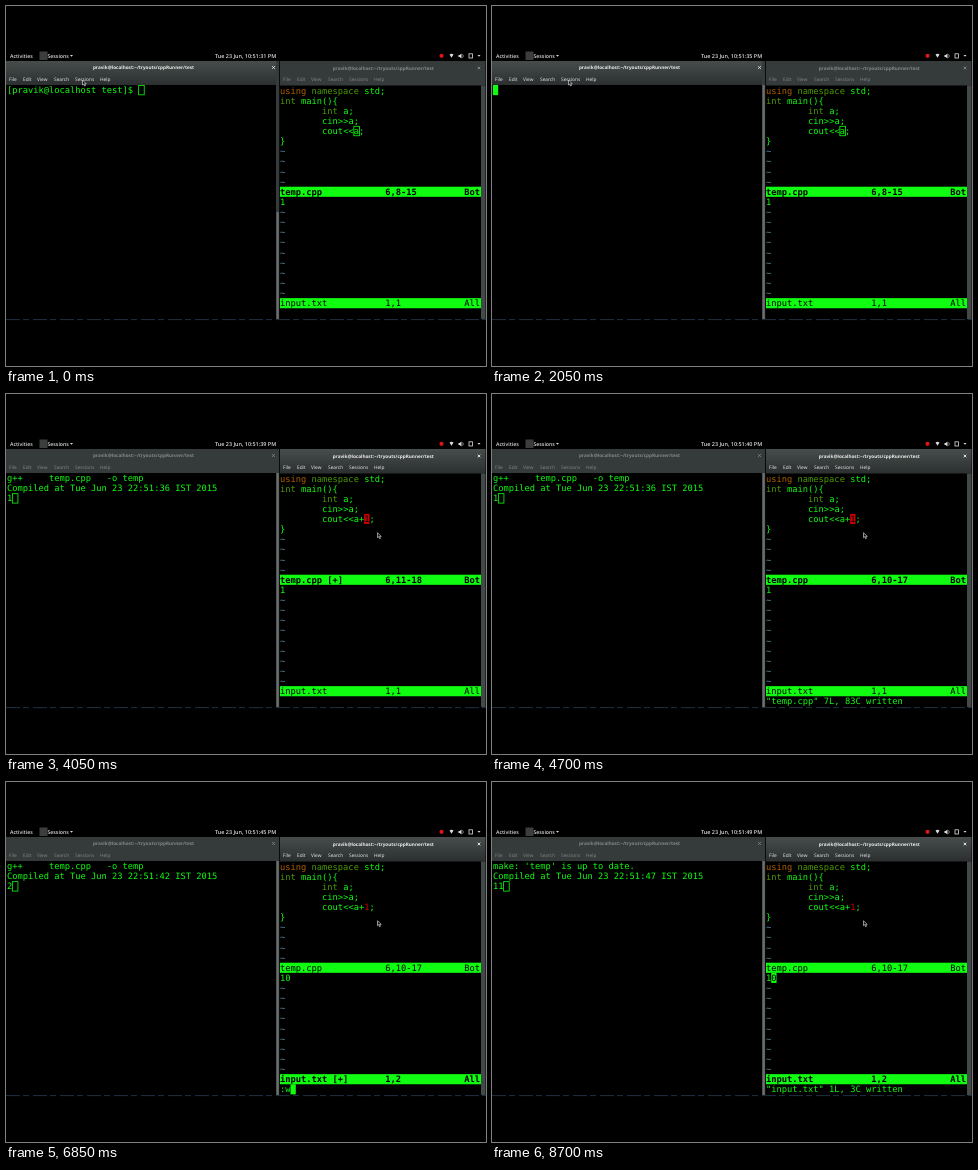
Write an HTML page that moves like this. It is 480 px wide and 360 px high and loops after 8800 ms.

```html
<!DOCTYPE html>
<html lang="en">
<head>
<meta charset="utf-8">
<title>Compile on save</title>
<style>
  html, body { margin: 0; width: 100%; height: 100%; overflow: hidden; background: #000; }
  svg { display: block; width: 480px; height: 360px; }
  text { white-space: pre; text-rendering: geometricPrecision; }
  .mono { font: 8.74px "DejaVu Sans Mono", monospace; }
  .ui { font: 4.8px "Open Sans", "Noto Sans", sans-serif; }
  .title { font-weight: 700; font-size: 4.65px; text-anchor: middle; }
  .bar { font-weight: 600; font-size: 5.2px; fill: #ddd; }
  .clock { font-size: 5.45px; text-anchor: middle; }
  .b { font-weight: 700; }
</style>
</head>
<body>
<svg id="stage" viewBox="0 0 480 360"></svg>
<script>
const LOOP = 8800, STEP = 50, CLOCK_RATE = 2.1, BLINK = 286;
const CW = 5.262, CH = 10.13, BASE = 8.1;
const GREEN = '#10fc10', TYPE = '#4e9a06', STATEMENT = '#af5f00', NUMBER = '#cc0000', TILDE = '#5f8fa8';
const USER = 'pravik';
const COMMAND = 'cppRunner temp.cpp';
const TYPE_FROM = 500, TYPE_GAP = 72;
const LEFT = { x: .9, y: 79 }, RIGHT = { x: 274, y: 79.4 };
const stage = document.getElementById('stage');

// Moments at which a key press restarts the cursor blink
const keys = [200, 2000, 3150, 3450, 3600, 3750, 4050, 4200, 4350, 4700,
  5550, 5700, 5900, 6200, 6600, 6850, 7350];
for (let i = 0; i < COMMAND.length; i++) keys.push(TYPE_FROM + i * TYPE_GAP);

// Latest value of a [time, value] list
const pick = (t, list) => list.reduce((v, [at, next]) => t >= at ? next : v, list[0][1]);
const esc = s => s.replace(/&/g, '&amp;').replace(/</g, '&lt;');
const rect = (x, y, w, h, fill, more = '') =>
  `<rect x="${x}" y="${y}" width="${w}" height="${h}" fill="${fill}" ${more}/>`;
const label = (x, y, s, cls, fill) =>
  `<text x="${x}" y="${y}" class="ui ${cls}" ${fill ? `fill="${fill}"` : ''}>${esc(s)}</text>`;
const cell = (pane, row, col, s, fill = GREEN, bold = false) =>
  `<text x="${pane.x + col * CW}" y="${pane.y + row * CH + BASE}" class="mono${bold ? ' b' : ''}" fill="${fill}">${esc(s)}</text>`;

function cursor(pane, row, col, char, solid, on, color = GREEN) {
  const x = pane.x + col * CW, y = pane.y + row * CH;
  if (!solid) return rect(x + .2, y + .4, CW + .3, CH - .7, 'none', `stroke="${GREEN}" stroke-width=".8"`);
  return on ? rect(x, y, CW, CH, color) + cell(pane, row, col, char, '#000') : '';
}

function frame(x, w, closeX, focused, dy) {
  const ink = focused ? '#eee' : '#858888';
  const menu = [['File', 3], ['Edit', 17], ['View', 31], ['Search', 48], ['Sessions', 69], ['Help', 94]];
  const cy = 61.5 + dy;
  return rect(x, 55, w, 24 + dy, focused ? 'url(#lit)' : '#353a3a') +
    label(x + 137.5 - x / 8 , 63.2 + dy, USER + '@localhost:~/tryouts/cppRunner/test', 'title', ink) +
    menu.map(([s, at]) => label(x + at, 74.8 + dy, s, '', ink)).join('') +
    `<path d="M${closeX - 1.3} ${cy - 1.3}l2.6 2.6m0-2.6l-2.6 2.6" stroke="${ink}" stroke-width=".9"/>`;
}

function topBar(t) {
  const sec = 31 + Math.floor(t / 1000 * CLOCK_RATE);
  const ink = '#ddd';
  return label(4, 51.7, 'Activities', 'bar') + rect(33.5, 45.5, 8, 8.5, '#3c3e3e') +
    label(41.5, 51.7, 'Sessions', 'bar') + `<path d="M64 49h3l-1.5 1.8z" fill="${ink}"/>` +
    label(239.6, 51.7, `Tue 23 Jun, 10:51:${sec} PM`, 'bar clock') +
    '<circle cx="435.5" cy="49.8" r="2.1" fill="#e01515"/>' +
    `<path d="M443.5 48.6q2-1.8 4 0l-2 3.2z" fill="${ink}"/>` +
    `<path d="M452.5 49h1.2l1.8-1.5v5l-1.8-1.5h-1.2z" fill="${ink}"/>` +
    `<path d="M456.6 48.3q1.4 1.7 0 3.4" fill="none" stroke="${ink}" stroke-width=".6"/>` +
    rect(463, 47.8, 3.4, 4.2, 'none', `stroke="${ink}" stroke-width=".8"`) +
    `<path d="M471.5 49h3l-1.5 1.8z" fill="${ink}"/>`;
}

function shell(t, focused, on) {
  const typed = Math.max(0, Math.min(COMMAND.length, Math.floor((t - TYPE_FROM) / TYPE_GAP) + 1));
  const gcc = 'g++     temp.cpp   -o temp';
  const fresh = "make: 'temp' is up to date.";
  const done = s => `Compiled at Tue Jun 23 22:51:${s} IST 2015`;
  const lines = pick(t, [
    [0, [`[${USER}@localhost test]$ ` + COMMAND.slice(0, typed)]],
    [2000, ['']],
    [2200, [gcc, '']],
    [2550, [gcc, done(36), '1']],
    [5050, [gcc, '']],
    [5250, [gcc, done(42), '2']],
    [7600, [fresh, '']],
    [7700, [fresh, done(47), '11']]
  ]);
  const last = lines.length - 1;
  return lines.map((s, i) => cell(LEFT, i, 0, s)).join('') +
    cursor(LEFT, last, lines[last].length, '', focused, on);
}

function status(row, name, ruler, where, active) {
  return rect(RIGHT.x, RIGHT.y + row * CH, 201, CH, GREEN) +
    [[0, name], [20, ruler], [35, where]].map(([c, s]) => cell(RIGHT, row, c, s, '#000', active)).join('');
}

function editor(t, focused, on) {
  const put = (...a) => cell(RIGHT, ...a);
  const lower = t >= 5550;
  const added = pick(t, [[0, ''], [3600, '+'], [3750, '+1']]);
  const code = put(0, 0, 'using', STATEMENT) + put(0, 6, 'namespace', TYPE) + put(0, 16, 'std;') +
    put(1, 0, 'int', TYPE) + put(1, 4, 'main(){') +
    put(2, 8, 'int', TYPE) + put(2, 12, 'a;') + put(3, 8, 'cin>>a;') +
    put(4, 8, 'cout<<a' + added.slice(0, 1)) + put(4, 16, added.slice(1), NUMBER) +
    put(4, 15 + added.length, ';') + put(5, 0, '}');
  const value = t < 5900 ? '1' : '10';
  let tildes = '';
  for (let r = 6; r < 21; r++) if (r < 10 || r > 11) tildes += put(r, 0, '~', TILDE);

  const topRuler = pick(t, [[0, '6,8-15'], [3450, '6,9-16'], [3600, '6,10-17'], [3750, '6,11-18'], [4100, '6,10-17']]);
  const lowRuler = pick(t, [[0, '1,1'], [5700, '1,2'], [5900, '1,3'], [6200, '1,2']]);
  const topName = 'temp.cpp' + (t >= 3600 && t < 4700 ? ' [+]' : '');
  const lowName = 'input.txt' + (t >= 5900 && t < 7350 ? ' [+]' : '');
  const message = pick(t, [
    [0, ''], [3450, '-- INSERT --'], [4050, ''], [4200, ':'], [4350, ':w'],
    [4700, '"temp.cpp" 7L, 83C written'], [5700, '-- INSERT --'], [6200, ''],
    [6600, ':'], [6850, ':w'], [7350, '"input.txt" 1L, 3C written']
  ]);

  // row, column, character under the cursor, colour
  let spot = lower
    ? pick(t, [[0, [11, 0, '1']], [5700, [11, 1, '']], [5900, [11, 2, '']], [6200, [11, 1, '0']]])
    : pick(t, [[0, [4, 14, 'a']], [3450, [4, 15, ';']], [3600, [4, 16, ';']], [3750, [4, 17, ';']],
      [4050, [4, 16, '1', NUMBER]]]);
  if (message[0] === ':') spot = [22, message.length, ''];
  const [row, col, char, color] = spot;

  return code + tildes +
    status(10, topName, topRuler, 'Bot', !lower) + put(11, 0, value) +
    status(21, lowName, lowRuler, 'All', lower) +
    put(22, 0, message, GREEN, message[0] === '-') +
    cursor(RIGHT, row, col, char, focused, on, color);
}

function pointer(t) {
  const p = Math.max(0, Math.min(1, (t - 2500) / 350));
  const k = p * p * (3 - 2 * p);
  return `<path transform="translate(${76.5 + 295 * k} ${74 + 64.7 * k})" d="M0 0v5l1.2-1 .9 2 .9-.4-.9-1.9h1.6z" fill="#111" stroke="#eee" stroke-width=".6"/>`;
}

function draw(t) {
  const rightOn = t >= 3150;
  const lastKey = Math.max(0, ...keys.filter(k => k <= t));
  const on = Math.floor((t - lastKey) / BLINK) % 2 === 0;
  const thumb = t < 2000 ? 206 : 79;
  return '<linearGradient id="lit" x2="0" y2="1"><stop stop-color="#474d4c"/><stop offset="1" stop-color="#2b2f2f"/></linearGradient>' +
    rect(0, 0, 480, 360, '#000') + topBar(t) +
    '<path d="M0 313.6h480" stroke="#1e3042" stroke-width="1" stroke-dasharray="14 3 6 4"/>' +
    frame(0, 270, 267.5, !rightOn, 0) + frame(274, 205.5, 473, rightOn, .5) +
    rect(270, 55, 3.2, 258, '#353a3a') + rect(270.5, thumb, 2.3, 313 - thumb, '#6a6f6e') +
    rect(475, 79.5, 4.5, 233.5, '#434848') +
    shell(t, !rightOn && t >= 200, on) + editor(t, rightOn, on) + pointer(t);
}

let shown = -1;
function tick(now) {
  const t = Math.floor((now % LOOP) / STEP) * STEP;
  if (t !== shown) stage.innerHTML = draw(shown = t);
  requestAnimationFrame(tick);
}
tick(performance.now());
</script>
</body>
</html>
```
